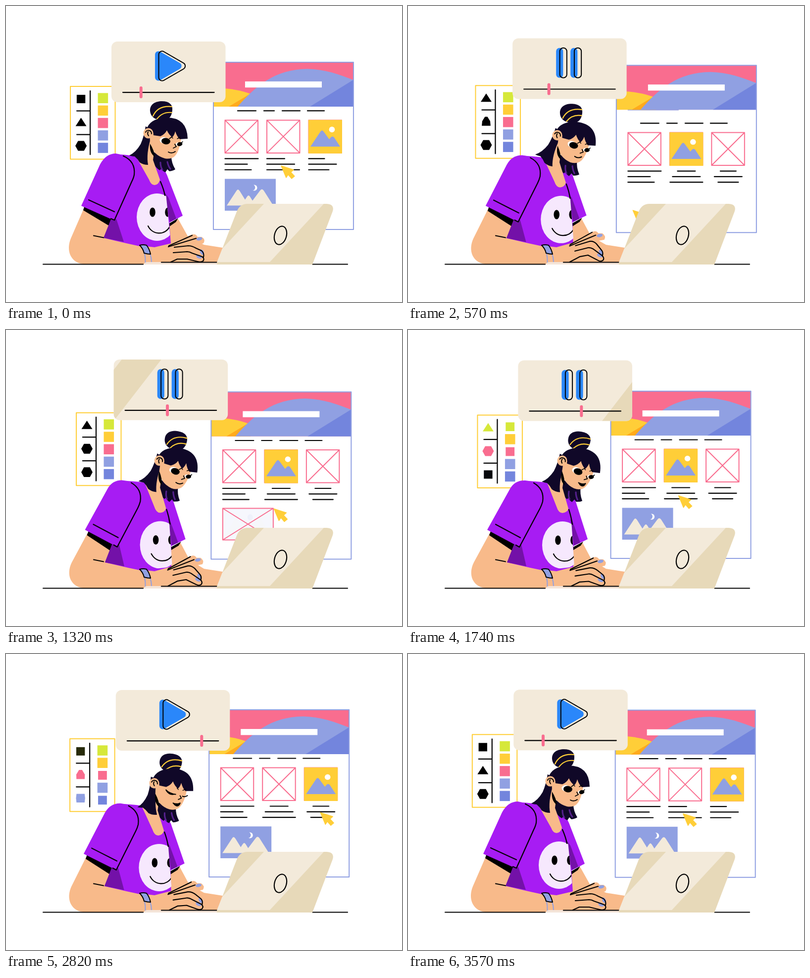
These frames come from a looping animation (800 by 600 pixels, 3600 ms). An HTML page with a canvas:

```html
<!DOCTYPE html>
<html lang="en">
<head>
<meta charset="utf-8">
<title>Designer at work</title>
<style>
html, body { margin: 0; width: 100%; height: 100%; overflow: hidden; background: #fff; }
canvas { display: block; width: 800px; height: 600px; }
</style>
</head>
<body>
<canvas id="stage" width="800" height="600"></canvas>
<script>
const ctx = document.getElementById('stage').getContext('2d');
const LOOP = 3600;
const C = {
  ink: '#000', hair: '#100828', skin: '#f8ba8a', shirt: '#a71cf3', shade: '#7311a8',
  face: '#f6e8fd', cream: '#f3eada', sand: '#e7d9b9', lilac: '#90a0e2', blue: '#7385dd',
  pink: '#f96d8f', yellow: '#ffce38', orange: '#ffaa1c', lime: '#d6e83a', play: '#2a87fa'
};
const BEATS = [0, 570, 900, 1740, 2340, 2820, 3570];

// --- timing helpers ---
const lerp = (a, b, p) => a + (b - a) * p;
const clamp = v => Math.min(1, Math.max(0, v));
const linear = (t, a, b) => clamp((t - a) / (b - a));
const ramp = (t, a, b) => { const p = linear(t, a, b); return p * p * (3 - 2 * p); };
const pulse = (t, a, b, c, d) => ramp(t, a, b) - ramp(t, c, d);

// Smooth curve through one value per beat, closing on the first value.
function sway(t, values) {
  const v = [...values, values[0]], last = BEATS.length - 1;
  if (t >= BEATS[last]) return v[0];
  const slope = i => i === 0 || i === last ? 0 : (v[i + 1] - v[i - 1]) / (BEATS[i + 1] - BEATS[i - 1]);
  let i = 0;
  while (t >= BEATS[i + 1]) i++;
  const d = BEATS[i + 1] - BEATS[i], p = (t - BEATS[i]) / d, q = 1 - p;
  return (1 + 2 * p) * q * q * v[i] + p * q * q * d * slope(i)
    + p * p * (3 - 2 * p) * v[i + 1] - p * p * q * d * slope(i + 1);
}

// Eased walk through [time, x, y] stops.
function walk(t, stops) {
  let i = 0;
  while (i < stops.length - 2 && t >= stops[i + 1][0]) i++;
  const [a, b] = [stops[i], stops[i + 1]], p = ramp(t, a[0], b[0]);
  return [lerp(a[1], b[1], p), lerp(a[2], b[2], p)];
}

// --- drawing helpers ---
const NUM = /-?\d+(\.\d+)?/g;
function mix(a, b, p) {
  const to = b.match(NUM);
  let i = 0;
  return a.replace(NUM, v => lerp(+v, +to[i++], p).toFixed(2));
}
function fill(d, color) { ctx.fillStyle = color; ctx.fill(new Path2D(d)); }
function line(d, width = 2.2, color = C.ink) {
  ctx.lineWidth = width;
  ctx.strokeStyle = color;
  ctx.stroke(new Path2D(d));
}
function box(x, y, w, h, color) { ctx.fillStyle = color; ctx.fillRect(x, y, w, h); }
function oval(x, y, rx, ry, color, turn = 0) {
  ctx.fillStyle = color;
  ctx.beginPath();
  ctx.ellipse(x, y, rx, ry, turn, 0, 7);
  ctx.fill();
}
function pill(x, y, w, h, r, color) {
  ctx.fillStyle = color;
  ctx.beginPath();
  ctx.roundRect(x, y, w, h, r);
  ctx.fill();
}
function group(x, y, draw) { ctx.save(); ctx.translate(x, y); draw(); ctx.restore(); }
function blend(a, b, p) {
  const ch = (c, i) => parseInt(c.slice(1 + 2 * i, 3 + 2 * i), 16);
  return `rgb(${[0, 1, 2].map(i => Math.round(lerp(ch(a, i), ch(b, i), p)))})`;
}
const blendPoints = (a, b, p) => a.map((pt, i) => pt.map((v, k) => lerp(v, b[i][k], p)));
// Points are [x, y, corner radius].
function roundPoly(pts) {
  ctx.beginPath();
  const n = pts.length, [a, z] = [pts[0], pts[n - 1]];
  ctx.moveTo((a[0] + z[0]) / 2, (a[1] + z[1]) / 2);
  pts.forEach((p, i) => {
    const q = pts[(i + 1) % n];
    ctx.arcTo(p[0], p[1], q[0], q[1], p[2]);
  });
  ctx.closePath();
}

// --- shape and colour palette ---
const HEX = [[-11.5, 0], [-6, -10], [6, -10], [11.5, 0], [6, 10], [-6, 10]];
const TRI = [[-5.5, -1], [0, -9.5], [0, -9.5], [5.5, -1], [11, 7.5], [-11, 7.5]];
const SQUARE = [[-8.7, 0], [-8.7, -8.5], [8.7, -8.5], [8.7, 0], [8.7, 8.5], [-8.7, 8.5]];

function palette(t) {
  box(0, 0, 90, 147.5, '#fff');
  ctx.lineWidth = 2;
  ctx.strokeStyle = C.yellow;
  ctx.strokeRect(0, 0, 90.5, 147.5);
  line('M40 9V138M13 49.5H39M13 97.5H39');
  const slots = [
    [SQUARE, TRI, pulse(t, 250, 450, 2600, 2760), C.lime, pulse(t, 1350, 1550, 2640, 2890)],
    [TRI, HEX, pulse(t, 450, 720, 2700, 2950), C.pink, pulse(t, 1500, 1700, 2870, 3150)],
    [HEX, SQUARE, pulse(t, 1300, 1500, 2720, 3100), C.lilac, pulse(t, 1700, 2000, 3000, 3590)]
  ];
  slots.forEach(([from, to, shape, color, tint], i) => {
    const pts = blendPoints(from, to, shape).map(([x, y]) => [x + 21.5, y + 25.5 + 47.5 * i]);
    fill('M' + pts.join('L') + 'Z', blend('#000000', color, tint));
  });
  const press = [pulse(t, 1450, 1550, 2550, 2700), 0, pulse(t, 1600, 1700, 2950, 3100), 0, pulse(t, 2000, 2100, 2950, 3100)];
  [C.lime, C.yellow, C.pink, C.lilac, C.blue].forEach((color, i) => {
    const s = 20.6 - 2.8 * press[i];
    box(65.8 - s / 2, 23.7 + 25.2 * i - s / 2, s, s, color);
  });
}

// --- video player ---
const bar = (x, r = 6.8) => [[x, 19.5, r], [x + 14.2, 19.5, r], [x + 14.2, 80, r], [x, 80, r]];
const triangle = x => [[x, 14.5, 6.9], [x + 53.5, 45.5, 6.9], [x + 53.5, 53.5, 6.9], [x, 84.5, 6.9]];

function player(t) {
  pill(0, 0, 230.5, 123, 12, C.cream);
  const s = lerp(-180, 240, linear(t, 1150, 1860));
  ctx.save();
  ctx.beginPath();
  ctx.roundRect(0, 0, 230.5, 123, 12);
  ctx.clip();
  fill(`M${s} 123L${s + 95} 0H${s + 175}L${s + 80} 123Z`, C.sand);
  ctx.restore();

  const pause = pulse(t, 170, 370, 2570, 2770);
  ctx.fillStyle = C.play;
  if (pause === 0) {
    roundPoly(triangle(88));
    ctx.fill();
  } else {
    const halves = [
      [[88, 14.5, 6.9], [115, 30.1, 0], [115, 68.9, 0], [88, 84.5, 6.9]],
      [[115, 30.1, 0], [141.5, 45.5, 6.9], [141.5, 53.5, 6.9], [115, 68.9, 0]]
    ];
    halves.forEach((half, i) => { roundPoly(blendPoints(half, bar(88 + 29 * i), pause)); ctx.fill(); });
  }
  ctx.strokeStyle = C.ink;
  ctx.lineWidth = 2;
  roundPoly(blendPoints(triangle(95.5), bar(95.5), pause));
  ctx.stroke();
  if (pause > 0) {
    ctx.globalAlpha = pause;
    roundPoly(blendPoints(bar(130), bar(124.8), pause));
    ctx.stroke();
    ctx.globalAlpha = 1;
  }
  line('M23 103H207.5');
  const knob = lerp(59.7, 173.5, linear(t, 275, 2720) - ramp(t, 2900, 3480));
  pill(knob - 3, 91, 6, 24, 3, C.pink);
}

// --- web page ---
const TEXT = [[67, 45, 53], [36, 56, 66], [32, 56, 41]];
const COLS = [23.5, 108, 192.5];

function frame(x, y, w, h) {
  line(`M${x} ${y}h${w}v${h}h${-w}zL${x + w} ${y + h}M${x + w} ${y}L${x} ${y + h}`, 2, C.pink);
}
function thumb(x, y, scale) {
  group(x + 34, y + 34, () => {
    ctx.scale(scale, scale);
    ctx.translate(-34, -34);
    box(0, 0, 68, 68, C.yellow);
    oval(47.5, 19.5, 5.8, 5.8, '#fff');
    fill('M4 54L24 24Q27.5 18.5 31 24L42 39L45 35.5Q48.5 31.5 52 35.5L64 54Z', C.lilac);
  });
}
function landscape() {
  group(23, 236.5, () => {
    box(0, 0, 103, 64.5, C.lilac);
    fill('M4 54L23 25Q26.5 18 30.5 25L41 42L45 36Q48 31 51 36L56 44L71 24Q75 18 79 24L98 54Z', C.cream);
    oval(59.5, 18, 6, 6, '#fff');
    oval(56, 17.5, 5.4, 6, C.lilac);
  });
}
function page(y, centred, imageX, grow, picture) {
  group(0, y, () => {
    line('M49 98.5H86M102 98.5H123M139 98.5H175M190 98.5H224');
    COLS.forEach((x, c) => {
      frame(x, 117.5, 66.5, 66.5);
      TEXT[c].forEach((w, r) => {
        const left = x + (c ? (67 - w) / 2 * centred : 0);
        line(`M${left} ${195.5 + 11.3 * r}h${w}`);
      });
    });
    ctx.globalAlpha = picture;
    if (picture > 0) landscape();
    ctx.globalAlpha = 1;
    thumb(imageX, 117, 1 + 0.05 * grow);
  });
}

const CURSOR = [
  [0, 136, 209], [150, 136, 209], [650, 25, 299], [890, 25, 299], [1230, 126, 236],
  [1350, 126, 236], [1700, 136, 211], [1800, 136, 211], [1970, 138, 176], [2040, 138, 176],
  [2500, 223, 176], [2580, 223, 176], [2800, 224, 207.5], [2930, 224, 207.5], [3460, 136, 209]
];

function website(t) {
  box(0, 0, 283, 339, '#fff');
  const [cx, cy] = walk(t, CURSOR);
  const scroll = ramp(t, 250, 640);
  ctx.save();
  ctx.beginPath();
  ctx.rect(0, 89, 283, 249);
  ctx.clip();
  if (scroll < 1) page(-228.5 * scroll, 0, 192, 0, 1);
  if (scroll > 0) {
    const drag = ramp(t, 2040, 2500);
    page(228.5 * (1 - scroll), 1 - ramp(t, 3000, 3400), lerp(107.5, 192, drag),
      pulse(t, 1960, 2040, 2500, 2600), ramp(t, 1300, 1420));
  }
  if (t > 880 && t < 1420) {
    const x = t < 1350 ? cx : 126, y = t < 1350 ? cy : 236;
    frame(23.5, 300, Math.max(1, x - 24), Math.min(-1, y - 300));
  }
  ctx.restore();

  box(0, 0, 283, 90, C.pink);
  fill('M0 53C25 51 55 57 75 64L60 90H0Z', C.yellow);
  fill('M31 90L76 63L80 90Z', C.orange);
  fill('M49 90C85 48 125 14 190 13.5C225 14 255 25 283 36V90Z', C.lilac);
  fill('M195 90L283 35.5V90Z', C.blue);
  box(64, 39, 155, 12.3, '#fff');
  line('M0 0H283V339H0Z', 2, C.lilac);
  group(cx, cy, () => {
    const arrow = 'M1 1L26 9L20.5 14L28 22L22 27L15 19L11 25Z';
    fill(arrow, C.yellow);
    line(arrow, 1.4, C.yellow);
  });
}

// --- designer ---
function torso(t) {
  const p = sway(t, [0, .6, .83, 1, .92, .62]);
  const m = (a, b) => mix(a, b, p);
  fill(m('M330 446L348 432L368 468L400 484L438 490L426 520L300 520L300 470Z',
    'M330 446L352 430L371 466L400 484L438 490L426 520L300 520L300 470Z'), C.skin);
  fill(m('M329 441L348 430L343 438L330 447Z', 'M332 441L354 429L349 437L334 446Z'), C.ink);
  fill(m('M157 411L131 471C121 495 130 520 156 523L300 523L300 488L205 468L212 440Z',
    'M165 412L133 471C121 495 130 520 156 523L300 523L300 488L205 468L216 444Z'), C.skin);
  fill(m('M158 407L214 430L209 446L156 414Z', 'M167 408L220 436L213 449L164 416Z'), C.ink);
  fill(m('M215 300Q240 301 262 304L300 300L313 318L325 342L357 425L330 439L333 482Q318 492 290 491Q245 482 197 470L222 420Z',
    'M230 306Q255 306 278 309L315 305L326 322L338 345L363 424L334 438L334 480Q318 492 290 491Q245 482 200 471L226 425Z'), C.shirt);
  fill(m('M212 432L223 432L238 478L197 470Z', 'M214 435L229 435L239 479L200 471Z'), C.shade);
  fill(m('M319 376L328 388L344 431L331 438Z', 'M328 383L333 390L348 431L335 437Z'), C.shade);

  ctx.save();
  ctx.clip(new Path2D(m('M250 370L322 370L333 480L250 490Z', 'M250 370L329 370L336 480L250 490Z')));
  ctx.translate(7 * p, 8 * p);
  oval(305, 428, 41, 48, C.face);
  oval(296, 418, 5.8, 9.5, C.ink);
  oval(327, 418, 5.8, 9.5, C.ink);
  line('M287 446C296 464 320 466 331 447');
  ctx.restore();

  line(m('M312 356Q319 372 321 384', 'M325 364Q330 380 332 394'));
  fill(m('M152 405L190 321Q202 299 222 299Q262 305 259 340L257 348L219 435Z',
    'M160 405L206 322Q216 304 237 305Q276 308 273 343L270 352L225 440Z'), C.shirt);
  line(m('M237 304Q262 315 259 342Q258 348 254 356L219 434L212 431',
    'M254 310Q276 323 272 348Q270 355 267 361L225 440L218 436'));
  line(m('M167 393L219 417', 'M177 394L227 421'));
  line('M177 465.5L197 469.5');
  return p;
}

function head(t, lean) {
  const x = sway(t, [288, 302, 307, 312, 309, 300]);
  const y = sway(t, [258, 262, 264, 265, 264, 262]);
  const turned = (degrees, draw) => group(x, y, () => {
    ctx.rotate(degrees * Math.PI / 180);
    ctx.translate(-288, -258);
    draw();
  });
  const tilt = sway(t, [0, 7.5, 8.7, 10.3, 8, 3.4]);
  const blink = pulse(t, 2690, 2760, 2880, 2960);
  const grin = pulse(t, 1300, 1600, 2950, 3250);

  turned(tilt, () => {
    fill('M296 296L297 318Q303 329 311 333L314 329Q316 335 322 337L326 331L330 335Q338 334 342 331Q334 318 334 304Z', C.hair);
    line('M312 317Q312 326 316 332M326 316Q328 325 332 330', 3.2, '#54208c');
  });
  fill(mix('M262 304L289 352Q293 363 300 363Q309 362 311 352L297 312L300 290L288 270Z',
    'M282 312L300 358Q304 371 312 371Q322 370 324 362L312 320L315 300L310 275Z', lean), C.skin);
  turned(sway(t, [0, 8.3, 6.3, 3.5, 0, -5.5]), () =>
    fill('M282 244Q279 264 272 280Q262 297 249 303Q255 305 260 305Q266 310 270 317Q277 322 287 322Q283 300 292 270L294 250Z', C.hair));
  turned(sway(t, [0, 2.5, 7, 11, 9.7, 9.4]), () => {
    fill('M291 213C290 199 302 193 315 193C330 193 337 200 336 211C335 222 331 229 321 231C304 233 292 226 291 213Z', C.hair);
    line('M297 223Q307 201 335 204M305 229Q316 214 335 216', 2.2, C.yellow);
  });
  turned(tilt, () => {
    fill('M290 245L291 279Q297 302 321 309Q339 312 346 297Q352 285 354 268L350 240L310 235Z', C.skin);
    fill('M291 279Q289 298 301 306Q300 294 291 279Z', C.ink);
    fill('M284 250Q290 229 322 226Q366 225 367 269L351 270Q345 264 342 254Q340 262 336 266Q329 261 325 252Q321 260 312 264L298 262Q298 252 290 249Z', C.hair);
    oval(287.5, 258, 10, 10.5, C.skin);
    line('M282 256C284 250 294 251 294 259M287 255Q285 259 288 263', 2);
    if (blink < .6) {
      const open = 1 - blink;
      oval(318.5, 272, 8, 6.3 * open, '#fff');
      oval(347, 280, 3.5, 3.5 * open, '#fff');
      oval(323, 274, 9, 6.5 * open, C.ink, .12);
      oval(351, 280, 5.5, 4 * open, C.ink, -.25);
      line('M330 269L334 266M354 277.5L357 275', 1.6);
    } else {
      fill('M311 270Q320 275 332 278Q320 283 312 272Z', C.ink);
      line('M312 270Q320 278 332 278M346 281Q351 283 356 279', 2);
    }
    line('M334 265L337 268M346 269L352 266', 1.4);
    line('M341 280L344 285L338 288', 1.8);
    line('M328 296Q335 300 342 295', 2);
    if (grin > 0) {
      ctx.globalAlpha = grin;
      fill('M327 295Q335 297 343 295Q341 303 335 302Q330 301 327 295Z', C.ink);
      ctx.globalAlpha = 1;
    }
  });
}

function hand(t) {
  const p = sway(t, [0, .8, 1, .35, .12, .35]);
  const m = (a, b) => mix(a, b, p);
  fill(m('M274 486L300 489L334 481L374 464Q383 460 387 468L395 468Q404 473 399 481L372 488Q390 490 400 502Q403 518 390 519L300 520L284 522Z',
    'M274 486L300 489L334 479L371 457Q379 452 384 459L392 459Q400 464 396 472L372 476Q384 480 393 504Q397 516 388 517L300 520L284 522Z'), C.skin);
  oval(390.5 - 4 * p, 472 - 8.5 * p, 6, 3.3, C.lilac, -.2);
  oval(396 - 8 * p, 499 + p, 3.5, 6, C.lilac, -.5);
  oval(390 - 3 * p, 508 - 3 * p, 6, 3.5, C.lilac, .4);
  line(m('M329 486L376 465', 'M327 483L371 457'));
  line(m('M328 488L384 471', 'M326 486L378 463'));
  line(m('M340 489L368 486Q376 486 384 491L395 496Q401 501 399 509',
    'M338 485L366 475Q374 473 380 480L391 496Q393 500 391 506'));
  line(m('M338 500L366 498Q371 498 376 501L396 508Q402 512 398 517Q394 520 387 518L366 513L346 513L333 519',
    'M337 496L363 488Q368 487 373 490L392 506Q396 511 393 515Q388 519 383 515L363 503L347 507L325 519'));
  line('M280 502Q282 510 281.5 520M291 502Q294 510 294 519', 2, C.lilac);
  const strap = 'M270 485Q277 483 284 485Q290 493 292 503Q286 503 279 501Q277 492 270 485Z';
  fill(strap, C.lilac);
  line(strap, 2);
}

function desk() {
  fill('M278 524Q280 519 286 519H428V524Z', '#f4e4d8');
  line('M75 523.5H277M619 523.5H690');
  line('M314 519.5H427');
  ctx.save();
  ctx.clip(new Path2D('M426 520L466 417Q472 401 488 401H648Q664 402 660 416L619 524H426Z'));
  box(420, 395, 250, 130, C.sand);
  fill('M521 401H642L533 519H412Z', C.cream);
  ctx.restore();
  ctx.lineWidth = 2.2;
  ctx.strokeStyle = C.ink;
  ctx.beginPath();
  ctx.ellipse(554.5, 465, 12, 19, .27, 0, 7);
  ctx.stroke();
}

function draw(t) {
  ctx.fillStyle = '#fff';
  ctx.fillRect(0, 0, 800, 600);
  const a = (t - 450) / LOOP * 2 * Math.PI, cos = Math.cos(a), sin = Math.sin(a);
  group(135 + 7 * sin, 168 - 7 * cos, () => palette(t));
  group(414 + 7 * cos, 118.7 + 6.8 * sin, () => website(t));
  group(218 - 7 * cos, 67 - 7.2 * sin, () => player(t));
  const lean = torso(t);
  head(t, lean);
  hand(t);
  desk();
}

ctx.lineCap = ctx.lineJoin = 'round';
const start = performance.now();
function tick() {
  draw((performance.now() - start) % LOOP);
  requestAnimationFrame(tick);
}
tick();
</script>
</body>
</html>
```
